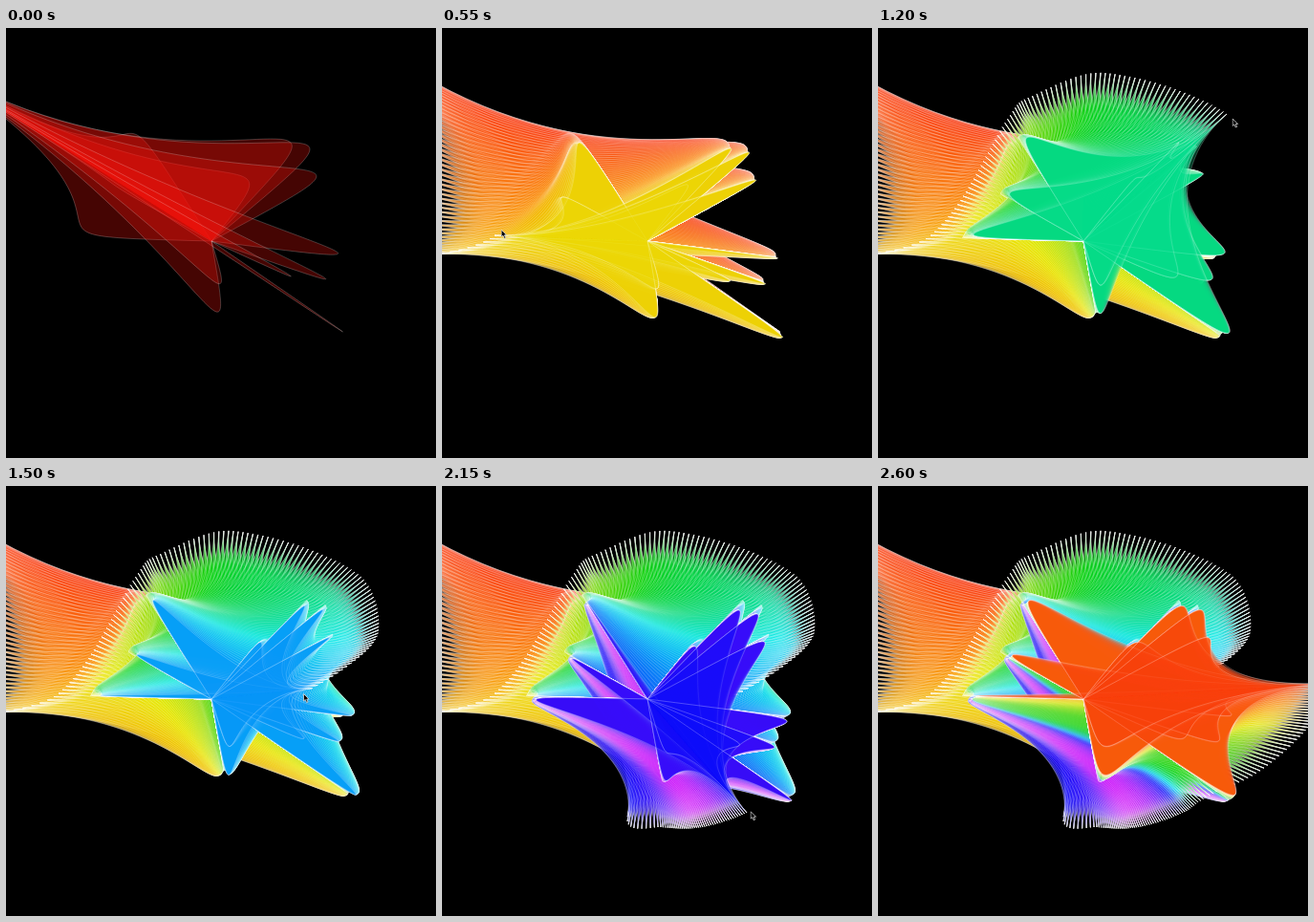
An HTML page with a canvas for the animation above (2650 ms loop, 450 by 450 pixels).

```html
<!DOCTYPE html>
<html lang="en">
<head>
<meta charset="utf-8">
<title>Petal trail</title>
<style>
html, body { margin: 0; width: 100%; height: 100%; overflow: hidden; background: #000; }
canvas, svg { position: absolute; left: 0; top: 0; }
</style>
</head>
<body>
<canvas id="stage" width="450" height="450"></canvas>
<svg id="cursor" width="8" height="12"><path d="M.5 .5V8L2.3 6.5 3.6 9.500 5 9 3.800 6H6Z" fill="#000" stroke="#ddd" stroke-width=".8"/></svg>
<script>
const LOOP = 2650, FRAME = 50, STEPS = 6;
const HUB = [215, 223];

// Petal tips, relative to the hub
const TIPS = [
  [-120, -3], [-65, -103], [-82, -46], [47, -59], [93, -97], [112, -93], [119, -64],
  [142, 18], [129, 45], [92, 42], [147, 101], [14, 80], [15, 50]
];
// A cubic with this handle peaks at 4/9 of its length.
const HANDLES = TIPS.map(tip => tip.map((v, i) => HUB[i] + v * 9 / 4));

// Pointer key points: time, x, y, hue
const KEYS = [
  [0, -95, 28, 2], [120, -55, 30, 12], [350, -20, 185, 33], [460, -25, 236, 46],
  [550, 55, 217, 55], [800, 141, 87, 83], [850, 157, 73, 95], [980, 236, 47, 128],
  [1200, 365, 90, 158], [1340, 390, 150, 183], [1440, 358, 188, 196], [1640, 225, 275, 228],
  [1715, 194, 350, 240], [1800, 229, 357, 253], [1980, 272, 357, 288], [2150, 319, 342, 240],
  [2240, 343, 326, 125], [2350, 400, 298, 105], [2460, 448, 255, 60], [2600, 480, 206, 13]
];

const ctx = document.getElementById("stage").getContext("2d");
const cursor = document.getElementById("cursor");
let done = 0;

function slope(i, c) {
  const a = KEYS[Math.max(0, i - 1)], b = KEYS[Math.min(KEYS.length - 1, i + 1)];
  return (b[c] - a[c]) / (b[0] - a[0]);
}

// Smooth curve through the key points
function pointerAt(t) {
  const next = KEYS.findIndex(k => k[0] > t);
  const i = (next < 0 ? KEYS.length : Math.max(1, next)) - 1;
  const j = Math.min(i, KEYS.length - 2);
  const a = KEYS[j], b = KEYS[j + 1], d = b[0] - a[0];
  const u = Math.min(1, (t - a[0]) / d), v = 1 - u;
  return [1, 2, 3].map(c =>
    a[c] * (1 + 2 * u) * v * v + b[c] * u * u * (3 - 2 * u) +
    d * u * v * (slope(j, c) * v - slope(j + 1, c) * u));
}

// Greens are darkened so that all hues look equally bright.
function fillFor(hue) {
  const green = Math.max(0, Math.cos((hue - 120) * Math.PI / 180));
  return `hsla(${hue},94%,${51 - 9 * green}%,.28)`;
}

function drawStep(n) {
  const [x, y, hue] = pointerAt(n * FRAME / STEPS);
  ctx.fillStyle = fillFor(hue);
  ctx.strokeStyle = "rgba(255,255,255,.36)";
  ctx.lineWidth = 0.6;
  for (const handle of HANDLES) {
    ctx.beginPath();
    ctx.moveTo(...HUB);
    ctx.bezierCurveTo(...handle, ...HUB, x, y);
    ctx.fill();
    ctx.stroke();
  }
}

function render(now) {
  const frame = Math.floor(now % LOOP / FRAME);
  const target = frame * STEPS + 1;
  if (target < done) done = 0;
  if (!done) ctx.clearRect(0, 0, 450, 450);
  while (done < target) drawStep(done++);
  // The drawing lags slightly behind the pointer.
  const [x, y] = pointerAt(frame * FRAME + 14);
  cursor.style.transform = `translate(${x}px,${y}px)`;
  requestAnimationFrame(render);
}
render(performance.now());
</script>
</body>
</html>
```
